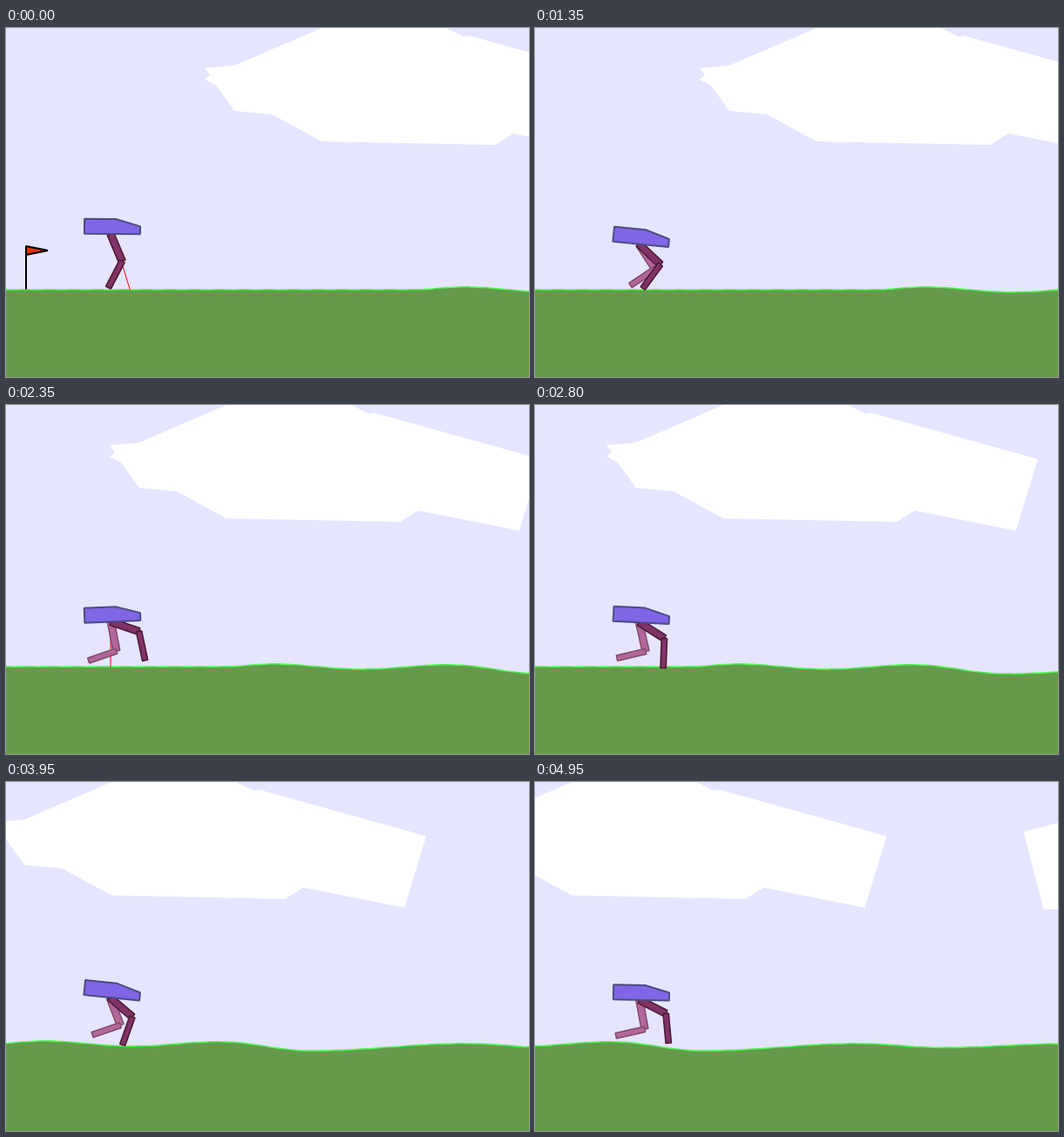
Write an HTML page with a canvas that moves like this. It is 600 px wide and 400 px high and loops after 5000 ms.

```html
<!DOCTYPE html>
<html>
<head>
<meta charset="utf-8">
<title>Two-legged walker</title>
<style>
html, body { margin: 0; width: 100%; height: 100%; overflow: hidden; background: #e5e5ff; }
canvas { display: block; }
</style>
</head>
<body>
<canvas id="stage" width="600" height="400"></canvas>
<script>
const ctx = document.getElementById('stage').getContext('2d');
const { sin, cos, exp, log, floor, min, PI } = Math;
const TAU = 2 * PI, LOOP = 5, FPS = 20;
const HULL_X = 120, LEG = 34, SEGMENT = 14, FLAT = 300;

// Crests and dips of the terrain; slopes between them are eased.
const hills = [[470, FLAT], [525, 296.8], [626, 302.9], [726, 297.7], [832, 308.2], [1010, 299.8], [1105, 304.5], [1250, FLAT]];

const clouds = [
  [[228, 46], [262, 43], [362, 0], [505, 0], [525, 10], [532, 9], [723, 62], [698, 144],
   [582, 121], [561, 134], [362, 130], [305, 99], [262, 95], [241, 66], [228, 59], [234, 54]],
  [[880, 57], [1000, 26], [1000, 146], [903, 146]]
];
const hullShape = [[-30, -9], [6, -9], [34, -1], [34, 8], [-30, 8]];

const ease = u => (1 - cos(PI * u)) / 2;
const mix = (a, b, u) => a + (b - a) * u;

function groundY(x) {
  const i = hills.findIndex(h => h[0] > x);
  if (i < 1) return FLAT;
  const [x1, y1] = hills[i - 1], [x2, y2] = hills[i];
  return mix(y1, y2, ease((x - x1) / (x2 - x1)));
}

// Speeds up softly to a steady run, with a slow surge on top.
function scrollAt(t) {
  const ramp = s => 0.4 * log(1 + exp((s - 0.97) / 0.4));
  return 162.7 * (ramp(t) - ramp(0)) + 3 * sin(TAU * t / 2.9);
}

// Starts upright, then settles into a gait that quickens slightly.
function poseAt(t) {
  const stride = -3.83 + 2.34 * t + 0.0546 * t * t;
  const start = ease(min(1, t / 0.5));
  const swing = (rest, middle, size, peak, rate = 1) =>
    mix(rest, middle + size * cos(TAU * rate * (stride - peak)), start);
  return {
    y: swing(228, 240.2, 1.7, 0.08, 2),
    tilt: swing(0.01, 0.02, 0.09, 0.34),
    front: [swing(0.4, 1.04, 0.24, 0.88), swing(-0.48, -0.22, 0.43, 0.97)],
    back: [swing(0.4, 0.4, 0.23, 0.54), swing(-0.48, -1.08, 0.27, 0.62)]
  };
}

function poly(points, fill, stroke, width = 2) {
  ctx.beginPath();
  points.forEach(([x, y]) => ctx.lineTo(x, y));
  ctx.closePath();
  ctx.fillStyle = fill;
  ctx.fill();
  if (stroke) {
    ctx.strokeStyle = stroke;
    ctx.lineWidth = width;
    ctx.stroke();
  }
}

function line([x1, y1], [x2, y2], color, width) {
  ctx.beginPath();
  ctx.moveTo(x1, y1);
  ctx.lineTo(x2, y2);
  ctx.strokeStyle = color;
  ctx.lineWidth = width;
  ctx.stroke();
}

// Draws one limb bone and returns its far end.
function bone([x, y], angle, width, fill, edge) {
  const s = sin(angle), c = cos(angle), h = width / 2;
  const at = (side, along) => [x + c * side + s * along, y - s * side + c * along];
  poly([at(-h, 0), at(h, 0), at(h, LEG), at(-h, LEG)], fill, edge, 1.5);
  return at(0, LEG);
}

function drawLeg(hip, [thigh, shin], fill, edge) {
  const knee = bone(hip, thigh, 8, fill, edge);
  bone(knee, shin, 6.4, fill, edge);
}

function drawGround(scroll) {
  const first = floor(scroll / SEGMENT) - 1;
  const points = Array.from({ length: 47 }, (_, i) => {
    const x = (first + i) * SEGMENT;
    return [x - scroll, groundY(x)];
  });
  poly([...points, [660, 400], [-30, 400]], '#66994c');
  points.slice(1).forEach((p, i) => line(points[i], p, (first + i) % 2 ? '#4ce64c' : '#4cff4c', 1.6));
}

// A sensor ray sweeps out and back in the first fifth of every two seconds.
function drawRay(t, y, scroll) {
  const count = floor(2 + t * 50) % 100;
  if (count >= 20) return;
  const angle = 0.15 * min(count, 19 - count);
  const at = reach => [HULL_X + sin(angle) * reach, y + cos(angle) * reach];
  let reach = 0;
  while (reach < 160 && at(reach)[1] < groundY(at(reach)[0] + scroll)) reach++;
  line([HULL_X, y], at(reach), '#ff0000', 1);
}

function draw(t) {
  const scroll = scrollAt(t);
  const { y, tilt, front, back } = poseAt(t);
  const onHull = ([px, py]) => [HULL_X + px * cos(tilt) - py * sin(tilt), y + px * sin(tilt) + py * cos(tilt)];

  ctx.fillStyle = '#e5e5ff';
  ctx.fillRect(0, 0, 600, 400);
  clouds.forEach(shape => poly(shape.map(([px, py]) => [px - scroll / 2, py]), '#ffffff'));
  drawGround(scroll);
  drawRay(t, y, scroll);

  const hip = onHull([0, 8]);
  drawLeg(hip, back, '#b36699', '#804c66');
  drawLeg(hip, front, '#803366', '#4c1a33');
  poly(hullShape.map(onHull), '#8066e6', '#4c4c80');

  const flag = 23 - scroll;
  line([flag, 250], [flag, FLAT - 0.5], '#000000', 2);
  poly([[flag, 250], [flag, 260], [flag + 25, 255]], '#e63300', '#000000');
}

ctx.lineJoin = 'bevel';
const began = performance.now();
function tick() {
  const t = (performance.now() - began) / 1000 % LOOP;
  draw(floor(t * FPS) / FPS);
  requestAnimationFrame(tick);
}
tick();
</script>
</body>
</html>
```
